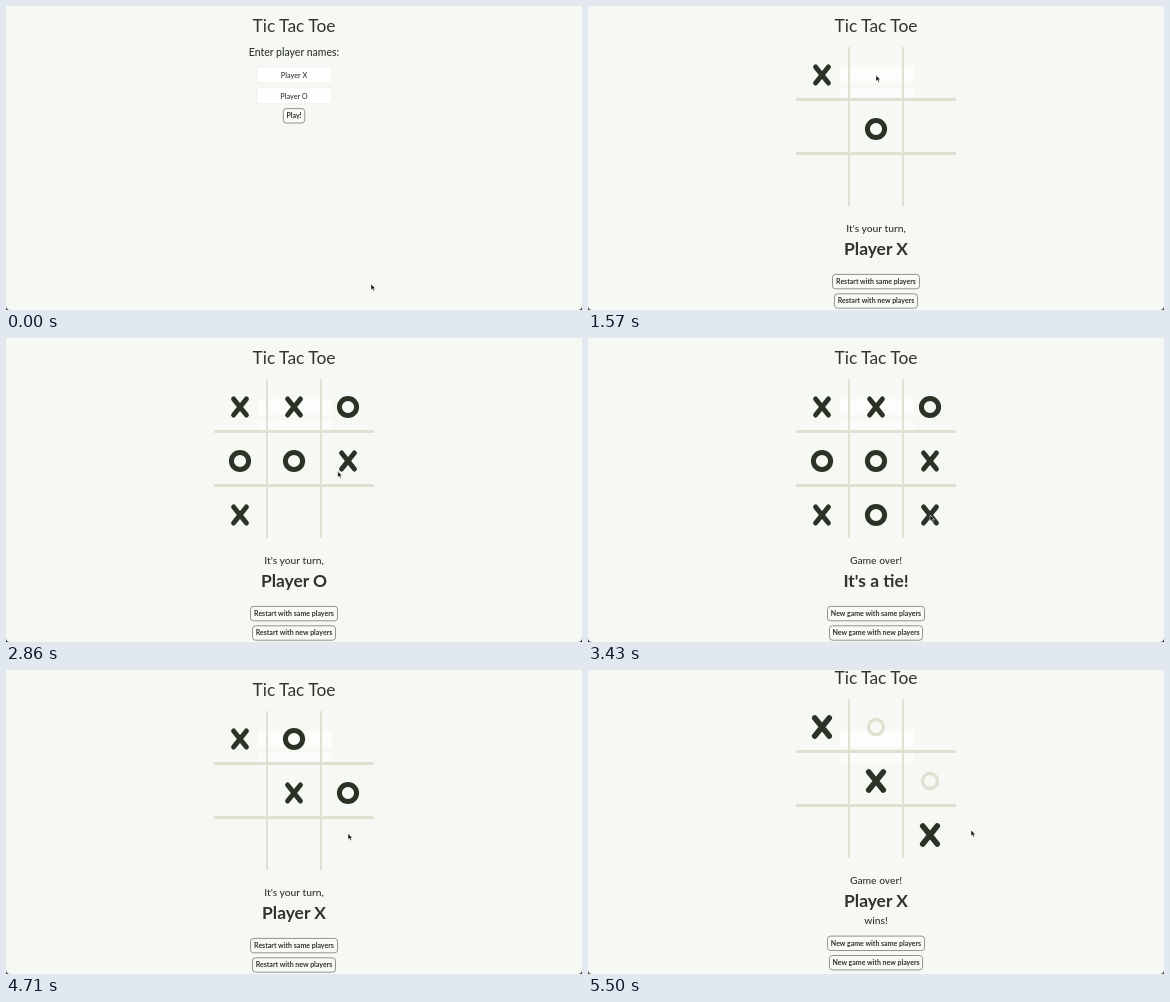
An HTML page that plays this animation: 576x304 px, repeating every 5710 ms.

```html
<!DOCTYPE html>
<html lang="en">
<head>
<meta charset="utf-8">
<title>Tic Tac Toe</title>
<style>
html, body { margin: 0; width: 100%; height: 100%; overflow: hidden; background: #f6f9f3; }
svg { display: block; width: 100vw; height: 100vh; }
text { font-family: Quicksand, Lato, sans-serif; text-anchor: middle; fill: #30342d; }
</style>
</head>
<body>
<svg id="stage" viewBox="0 0 576 304"></svg>
<script>
// Time is counted in ticks, seven per second.
const LOOP = 5710, LAST = 38.5, BOARD = 5, TRAVEL = 1.5;
const DARK = '#2b3326', PALE = '#dde1d2', PAPER = '#f6f9f3';
const stage = document.getElementById('stage');

const cellPos = cell => ({ x: 234 + cell % 3 * 54, y: 69 + Math.floor(cell / 3) * 54 });

// Cells in order of play; X and O take turns at a steady pace.
const plan = (cells, start, gap) =>
  [...cells].map((cell, i) => ({ cell: +cell, isX: i % 2 === 0, t: start + i * gap, ...cellPos(cell) }));
const tieGame = plan('041263578', 7, 2.05);
const wonGame = plan('01458', 29.5, 1);
const REMATCH = 29, WIN = wonGame[4].t;

// Places the pointer reaches, and when.
const stops = [
  { t: 0, x: 365, y: 278 }, { t: 3, x: 289, y: 112 }, ...tieGame,
  { t: 26, x: 288, y: 275 }, ...wonGame, { t: 36, x: 383, y: 160 }
];

function pointer(tick) {
  const i = stops.findLastIndex(s => s.t <= tick);
  const a = stops[i], b = stops[i + 1] || a;
  const leave = Math.max(a.t, b.t - TRAVEL);
  const f = b === a ? 0 : Math.max(0, (tick - leave) / (b.t - leave));
  const ease = 1 - (1 - f) ** 2;
  return `<path transform="translate(${a.x + (b.x - a.x) * ease} ${a.y + (b.y - a.y) * ease})"
    d="M0 0V6L1.4 4.8L2.4 7L3.5 6.5L2.6 4.4H4.4Z" fill="#111" stroke="#fff" stroke-width=".5"/>`;
}

const text = (s, y, size, weight = 500) =>
  `<text x="288" y="${y}" font-size="${size}" font-weight="${weight}">${s}</text>`;

const rect = (x, y, w, h, attrs) =>
  `<rect x="${x}" y="${y}" width="${w}" height="${h}" ${attrs}/>`;

const title = text('Tic Tac Toe', 26, 17.4, 400);

const button = (s, y, w) =>
  rect(288 - w / 2, y - 7.2, w, 14.4, 'rx="3" fill="#f8faf6" stroke="#777b73" stroke-width=".8"') +
  text(s, y + 2.4, 7, 700);

function mark({ x, y, isX }, won) {
  const lost = won && !isX;
  const shape = isX ? '<path d="M-6.4-8L6.4 8M6.4-8L-6.4 8"/>' : `<circle r="${lost ? 7.5 : 8.6}"/>`;
  return `<g transform="translate(${x} ${y}) scale(${won && isX ? 1.13 : 1})" fill="none"
    stroke="${lost ? PALE : DARK}" stroke-width="${lost ? 3.3 : 5}" stroke-linecap="round">${shape}</g>`;
}

const form = () => title + text('Enter player names:', 50.3, 10.5) +
  ['X', 'O'].map((name, i) => {
    const y = 61 + i * 20.7;
    return rect(251, y, 75, 16, 'rx="2" fill="#fff" stroke="#e9ece5" stroke-width=".6"') +
      text('Player ' + name, y + 10.8, 7.3);
  }).join('') + button('Play!', 109.8, 21.5);

const grid = `<path d="M261 41V200M315 41V200" stroke="${PALE}" stroke-width="2"/>
  <path d="M208 93.5H368M208 147.5H368" stroke="${PALE}" stroke-width="3"/>`;

// The form's fields stay faintly visible behind the board.
const fields = rect(252, 61, 74, 16, 'fill="#fff" opacity=".75"') +
  rect(252, 82, 74, 12, 'fill="#fff" opacity=".6"');

function game(tick) {
  const moves = (tick < REMATCH ? tieGame : wonGame).filter(m => m.t <= tick);
  const won = tick >= WIN, tie = moves.length === 9, over = won || tie;
  const player = 'Player ' + (won || moves.length % 2 === 0 ? 'X' : 'O');
  const verb = over ? 'New game' : 'Restart', width = over ? 97 : 87;
  const drop = won ? 9.7 : 0;
  // Scrolls down quickly after the win, then drifts back.
  const scroll = Math.max(0, Math.min(7 * (tick - 34), 14 - 0.8 * (tick - 36)));
  const bar = scroll && tick < LAST ? rect(572.5, 12, 3, 292, 'rx="1.5" fill="#85877f"') : '';
  return fields + `<g transform="translate(0 ${-scroll})">` + title + grid +
    moves.map(m => mark(m, won)).join('') +
    text(over ? 'Game over!' : "It's your turn,", 226, 10.3) +
    text(tie ? "It's a tie!" : player, 248.9, 17.4, 700) +
    (won ? text('wins!', 266, 10.3) : '') +
    button(verb + ' with same players', 275.6 + drop, width) +
    button(verb + ' with new players', 295 + drop, width - 4) + '</g>' + bar;
}

const corners = '<path d="M0 300Q0 304 4 304H0ZM576 300Q576 304 572 304H576Z" fill="#222"/>';

const ticks = [...Array(38).keys(), LAST];
const startOf = tick => Math.round(tick * 100 / 7) * 10;

let shown;
function frame(now) {
  const t = now % LOOP;
  const tick = ticks.findLast(k => startOf(k) <= t);
  if (tick !== shown) {
    shown = tick;
    stage.innerHTML = rect(0, 0, 576, 304, `fill="${PAPER}"`) +
      (tick < BOARD ? form() : game(tick)) + pointer(tick) + corners;
  }
  requestAnimationFrame(frame);
}
frame(0);
</script>
</body>
</html>
```
